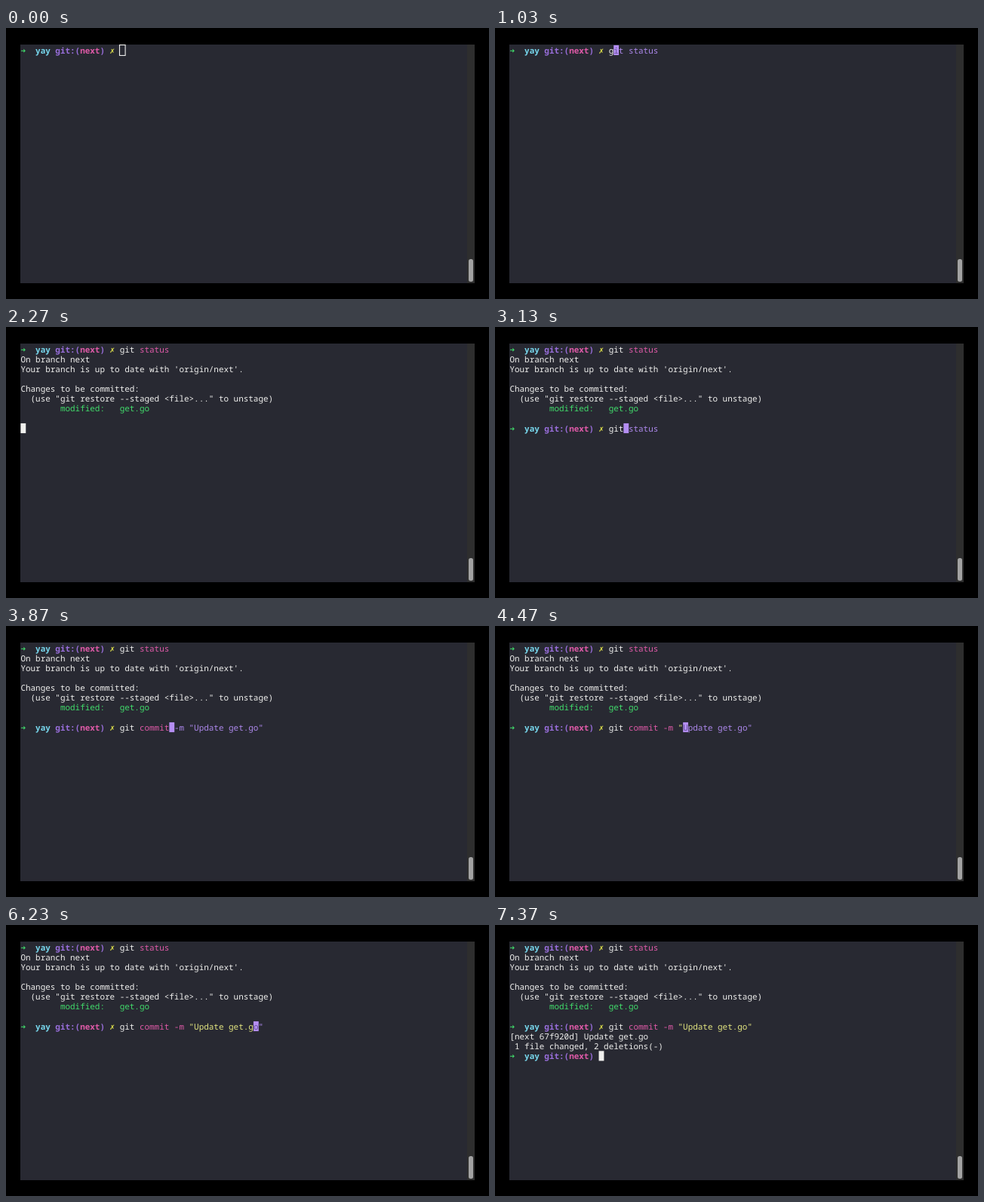
An HTML page that plays this animation: 640 by 360 pixels, repeating every 8000 ms.

```html
<!DOCTYPE html>
<html lang="en">
<head>
<meta charset="utf-8">
<title>Terminal session</title>
<style>
  html, body { margin: 0; width: 100%; height: 100%; overflow: hidden; background: #000; }
  svg { display: block; width: 640px; height: 360px; }
  text {
    font: 500 10.94px "Noto Sans Mono", "DejaVu Sans Mono", monospace;
    white-space: pre;
    text-rendering: geometricPrecision;
    font-variant-ligatures: none;
  }
  .bold { font-weight: 700; }
  .sign { font-family: "DejaVu Sans Mono", monospace; font-weight: 700; }
</style>
</head>
<body>
<svg viewBox="0 0 640 360">
  <rect width="640" height="360" fill="#000"/>
  <rect x="19" y="22" width="602" height="317" fill="#282932"/>
  <rect x="611" y="22" width="10" height="317" fill="#2e2e2e"/>
  <rect x="613" y="307" width="6" height="30" rx="2.5" fill="#a3a3a3"/>
  <g id="screen"></g>
</svg>
<script>
const LOOP = 8000;
const CELL = 6.564, LINE = 13.13, LEFT = 19.4, TOP = 22.9, BASE = 10.6;
const C = {
  white: '#f0f0ee', green: '#41dc6b', cyan: '#78d8ee', violet: '#9a6fdd',
  pink: '#df5aa8', lime: '#e6e84c', yellow: '#e4e680', ghost: '#ad88ec',
  block: '#b48ef2', under: '#67509a'
};
const screen = document.getElementById('screen');
const NS = screen.namespaceURI;

// Each command: full text, [start, colour] parts, and the time of every key.
const status = {
  row: 0, prompt: 0, text: 'git status',
  parts: [[0, C.white], [4, C.pink]],
  keys: [1030, 1130, 1230, 1350, 1470, 1600, 1770, 1870, 1970, 2070],
  enter: 2270, hint: () => 'git status'
};
const commit = {
  row: 8, prompt: 2370, text: 'git commit -m "Update get.go"',
  parts: [[0, C.white], [4, C.pink], [14, C.yellow]],
  keys: [2830, 2970, 3100, 3230, 3400, 3630, 3690, 3750, 3810, 3870, 4000,
    4170, 4250, 4350, 4470, 4900, 5000, 5100, 5200, 5300, 5400, 5500,
    5770, 5870, 5970, 6100, 6230, 6330, 6470],
  enter: 7000, hint: n => n < 5 ? status.text : commit.text
};
const FOCUS = 350, RESULT = 7060, LAST_PROMPT = 7130;

function add(tag, attrs, content) {
  const el = document.createElementNS(NS, tag);
  for (const name in attrs) el.setAttribute(name, attrs[name]);
  if (content) el.textContent = content;
  screen.append(el);
}

const colX = col => LEFT + col * CELL;
const rowY = row => TOP + row * LINE;

function write(row, col, str, fill = C.white, cls = '') {
  if (str) add('text', { x: colX(col), y: rowY(row) + BASE, fill, class: cls }, str);
}

function cursor(row, col, fill = C.white) {
  add('rect', { x: colX(col), y: rowY(row), width: CELL + 0.3, height: LINE, fill });
}

function hollowCursor(row, col) {
  add('rect', { x: colX(col) - 0.2, y: rowY(row) - 0.4, width: 7.6, height: 14,
    fill: 'none', stroke: C.white, 'stroke-width': 1.1 });
}

function prompt(row, dirty) {
  write(row, 0, '➜', C.green, 'sign');
  write(row, 3, 'yay', C.cyan, 'bold');
  write(row, 7, 'git:(', C.violet, 'bold');
  write(row, 12, 'next', C.pink, 'bold');
  write(row, 16, ')', C.violet, 'bold');
  if (dirty) write(row, 18, '✗', C.lime, 'sign');
}

function command(cmd, t) {
  if (t < cmd.prompt) return;
  const { row, text, parts } = cmd;
  const n = cmd.keys.filter(k => k <= t).length;
  prompt(row, true);
  parts.forEach(([from, fill], i) => {
    const to = i + 1 < parts.length ? parts[i + 1][0] : text.length;
    write(row, 20 + from, text.slice(from, Math.min(to, n)), fill);
  });
  if (t >= cmd.enter) return;
  const rest = n ? cmd.hint(n).slice(n) : '';
  if (rest) {
    cursor(row, 20 + n, C.block);
    write(row, 20 + n, rest[0], C.under);
    write(row, 21 + n, rest.slice(1), C.ghost);
  } else if (t < FOCUS) {
    hollowCursor(row, 20);
  } else {
    cursor(row, 20 + n);
  }
}

function draw(t) {
  screen.replaceChildren();
  command(status, t);
  if (t >= status.enter) {
    write(1, 0, 'On branch next');
    write(2, 0, "Your branch is up to date with 'origin/next'.");
    write(4, 0, 'Changes to be committed:');
    write(5, 2, '(use "git restore --staged <file>..." to unstage)');
    write(6, 8, 'modified:   get.go', C.green);
    if (t < commit.prompt) cursor(8, 0);
  }
  command(commit, t);
  if (t >= commit.enter && t < RESULT) cursor(9, 0);
  if (t >= RESULT) {
    write(9, 0, '[next 67f920d] Update get.go');
    write(10, 1, '1 file changed, 2 deletions(-)');
    if (t < LAST_PROMPT) cursor(11, 0);
  }
  if (t >= LAST_PROMPT) {
    prompt(11, false);
    cursor(11, 18);
  }
}

// The screen only changes at these moments.
const moments = [0, FOCUS, ...status.keys, status.enter, commit.prompt,
  ...commit.keys, commit.enter, RESULT, LAST_PROMPT];
let shown = -1;

function tick() {
  const t = performance.now() % LOOP;
  const step = moments.filter(m => m <= t).length;
  if (step !== shown) {
    shown = step;
    draw(t);
  }
  requestAnimationFrame(tick);
}
tick();
</script>
</body>
</html>
```
